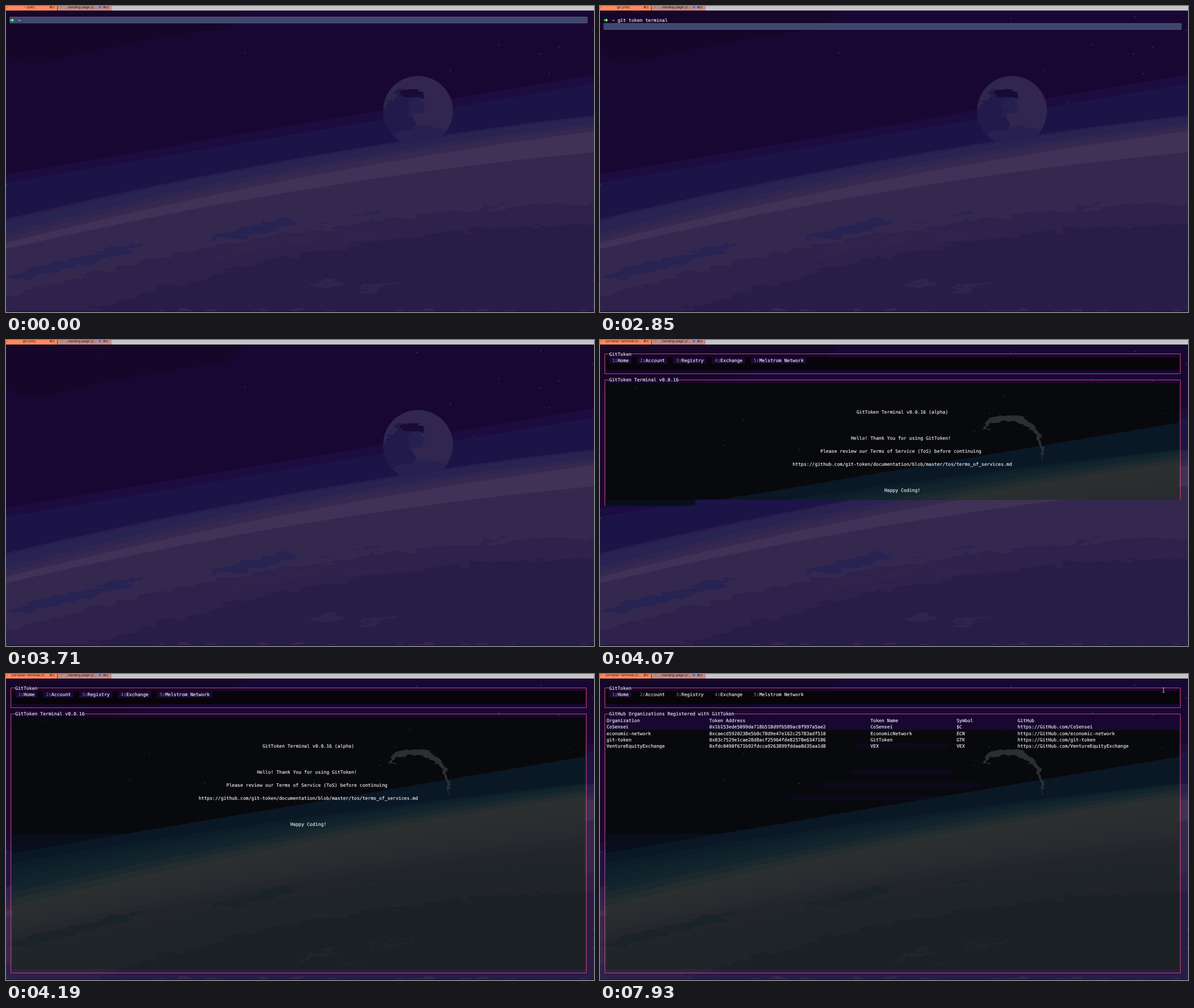
Animation of 1036x540 px, one loop 8000 ms. Source, as an HTML page:

```html
<!DOCTYPE html>
<html lang="en">
<head>
<meta charset="utf-8">
<title>Terminal session</title>
<style>
html, body { margin: 0; width: 100%; height: 100%; overflow: hidden; background: #190733; }
svg { display: block; width: 1036px; height: 540px; }
text { text-rendering: geometricPrecision; white-space: pre; }
.mono text { font: 8.13px "DejaVu Sans Mono", monospace; fill: #f1eff3; stroke: #f1eff3; stroke-width: .15px; }
.mono .dim { fill: #8d8298; stroke: none; }
.tabs text { font: 6.3px "Liberation Sans", "DejaVu Sans", sans-serif; fill: #211a1c; }
</style>
</head>
<body>
<svg id="stage" viewBox="0 0 1036 540">
  <defs>
    <clipPath id="inner"><rect x="11" y="76" width="1009" height="445"/></clipPath>
    <clipPath id="partial"><path d="M0 0H1036V281.5H168V293H0Z"/></clipPath>
    <clipPath id="disc"><circle cx="726" cy="185" r="61.5"/></clipPath>
    <filter id="rough" color-interpolation-filters="sRGB">
      <feTurbulence type="fractalNoise" baseFrequency=".03 .09" numOctaves="3" seed="4"/>
      <feDisplacementMap in="SourceGraphic" scale="26" xChannelSelector="R" yChannelSelector="G"/>
    </filter>
  </defs>
</svg>
<script>
const LOOP = 8000, COL = 4.895, ROW = 11.43, LEFT = 6.5, TOP = 19;
const colX = c => LEFT + c * COL;
const rowY = r => TOP + r * ROW;
const rect = (x, y, w, h, fill) =>
  `<rect x="${x}" y="${y}" width="${w}" height="${h}" fill="${fill}"/>`;
const path = (d, fill, extra = '') => `<path d="${d}" fill="${fill}" ${extra}/>`;
const blob = (x, y, rx, ry, turn, fill) =>
  `<ellipse rx="${rx}" ry="${ry}" fill="${fill}" transform="translate(${x} ${y}) rotate(${turn})"/>`;
const cell = (col, row, str) =>
  `<text x="${colX(col).toFixed(2)}" y="${(rowY(row) + 8.5).toFixed(2)}">${str}</text>`;
const group = (id, body, attrs = '') => `<g id="${id}" ${attrs}>${body}</g>`;
const rough = body => `<g filter="url(#rough)">${body}</g>`;
const repeat = (n, make) => Array.from({ length: n }, (_, i) => make(i)).join('');

let seed = 7;
const random = (min, max) => {
  seed = seed * 16807 % 2147483647;
  return +(min + (max - min) * seed / 2147483647).toFixed(1);
};

const mix = (a, b, k) => '#' + [1, 3, 5].map(i => {
  const [p, q] = [a, b].map(c => parseInt(c.slice(i, i + 2), 16));
  return Math.round(p + (q - p) * k).toString(16).padStart(2, '0');
}).join('');

// A band fills everything below a curve: left, control and right heights, colour.
const band = ([left, mid, right, fill]) =>
  path(`M0 ${left}Q518 ${mid} 1036 ${right}V540H0Z`, fill);
const bands = (edges, steps = 1) => edges.map((edge, i) => {
  const next = edges[i + 1] || edge;
  return repeat(edge === next ? 1 : steps, s => {
    const k = s / steps;
    return band([...edge.slice(0, 3).map((v, j) => v + (next[j] - v) * k), mix(edge[3], next[3], k)]);
  });
}).join('');

const stars = (bright, dim) => repeat(45, i => {
  const x = random(0, 1036), size = i % 4 ? 1 : 1.6;
  return rect(x, random(10, 340 - x * .18), size, size, i % 4 ? dim : bright);
});

const streaks = (n, x0, x1, y0, slope, fill) => repeat(n, () => {
  const x = random(x0, x1);
  return blob(x, y0 + slope * x + random(-16, 16), random(12, 45), random(1, 4), -11, fill);
});

const ground = c => rough(
  band([516, 366, 345, c.land]) + streaks(14, 560, 1036, 420, -.05, c.red) +
  band([590, 390, 387, c.dark]) +
  blob(120, 452, 125, 8, -14, c.blue) + blob(440, 395, 78, 8, -13, c.blue) +
  blob(637, 368, 18, 4, -5, c.blue) +
  streaks(14, 360, 620, 500, -.17, c.cloud) + streaks(5, 550, 690, 590, -.15, c.cloud));

const moon = `<g clip-path="url(#disc)">` + rect(664, 123, 124, 124, '#31264f') + rough(
  blob(694, 192, 30, 46, 12, '#221a4b') + blob(726, 236, 54, 24, -9, '#262152') +
  blob(722, 180, 14, 16, 0, '#262050') + blob(718, 156, 22, 8, 4, '#190a36')) + '</g>';

const night = rect(0, 0, 1036, 540, '#190733') +
  path('M0 8H420L390 40Q210 62 64 101 20 104 0 82Z', '#160629') +
  bands([[297, 209, 121, '#1d0c3f'], [312, 225, 137, '#1c1447']]) +
  stars('#24586c', '#3b3a6b') + moon +
  bands([[376, 252, 193, '#2b1e4c'], [381, 256, 196, '#282352'], [400, 264, 208, '#30264f'],
    [410, 272, 214, '#362950'], [418, 287, 221, '#403157'], [429, 307, 258, '#34284f']]) +
  ground({ land: '#2e214b', red: '#33204b', dark: '#281c48', blue: '#272353', cloud: '#30244d' }) +
  rect(0, 538.5, 1036, 1.5, '#1d1238');

const WELCOME = [
  [91, 9, 'GitToken Terminal v0.0.16 (alpha)'],
  [89, 13, 'Hello! Thank You for using GitToken!'],
  [78, 15, 'Please review our Terms of Service (ToS) before continuing'],
  [68, 17, 'https://github.com/git-token/documentation/blob/master/tos/terms_of_services.md'],
  [101, 21, 'Happy Coding!']
];
const residue = WELCOME.map(([col, row, str]) =>
  rect(colX(col), rowY(row) + 1, str.length * COL, ROW - 3, '#0c091d')).join('');

const crescent = rough(
  path('M668 160A61.5 61.5 0 0 1 772 226 62 62 0 0 0 752 150Q712 132 668 160Z', '#2b2f32') +
  blob(734, 238, 28, 5, -4, '#1d282e'));

const shade = rect(0, 60, 1036, 480, '#08090d') + group('residue', residue) +
  rect(0, 282, 1036, 258, '#080e1b') + stars('#2a3f4a', '#1c2127') +
  band([318, 230, 143, '#0a1725']) +
  `<g clip-path="url(#disc)">${crescent}</g>` +
  bands([[335, 246, 191, '#0c1d29'], [375, 258, 194, '#12252c'], [412, 284, 213, '#2c2f30'],
    [434, 316, 258, '#292c2f'], [470, 350, 300, '#22262b'], [540, 420, 370, '#1d2328']], 3) +
  ground({ land: '#1f2429', red: '#22242b', dark: '#1a2024', blue: '#1a2329', cloud: '#1f2529' });

const tabs = rect(0, 0, 1036, 8, '#c5c4c6') + rect(0, 0, 90, 8, '#ff895f') +
  rect(90, 0, 1.5, 8, '#5d4040') + rect(91.5, 0, 94.5, 8, '#c28d83') +
  '<text x="0" y="4" opacity=".4">×</text><text x="96" y="4" opacity=".4">×</text>' +
  '<text id="tabTitle" x="41" y="4.1" text-anchor="middle"></text>' +
  '<text x="76" y="4.1">⌘1</text><text x="104" y="4.1">.../landing-page (z...</text>' +
  '<circle cx="165.5" cy="2" r="2.4" fill="#2f7cf6"/><text x="170.5" y="4.1">⌘2</text>';

const guide = rect(LEFT, 0, 1018, 11.4, '#59628a') + rect(LEFT, .8, 1018, 9.8, '#40466f');
const shell = group('guide', guide) +
  path('M7 24.1H10.2V21.6L14.3 25 10.2 28.4V25.9H7Z', '#5dfa68') +
  cell(3, 0, '~') + group('typed', cell(5, 0, ''));

// Box border that leaves a gap for its title.
const frame = (top, bottom, title) => {
  const [y0, y1] = [top, bottom].map(r => Math.floor(rowY(r) + ROW / 2) + .5);
  return path(`M${colX(2)} ${y0}H8.5V${y1}H1022.5V${y0}H${colX(2 + title.length)}`, 'none',
    'stroke="#c2485f"') + cell(2, top, title);
};

let nextCol = 3;
const ITEMS = ['Home', 'Account', 'Registry', 'Exchange', 'Melstrom Network'].map(name => {
  const item = { name, col: nextCol };
  nextCol += name.length + 2 + (name === 'Home' ? 4 : 4);
  return item;
});
const itemBack = ({ name, col }) =>
  rect(colX(col - 1), rowY(1), (name.length + 4) * COL, ROW, '#190833');
const menu = rect(11, rowY(1), 1009, 2 * ROW, '#070509') + itemBack(ITEMS[0]) +
  group('itemBacks', ITEMS.slice(1).map(itemBack).join('')) +
  ITEMS.map(({ name, col }, i) =>
    cell(col, 1, `<tspan class="dim">${i + 1}</tspan>:${name}`)).join('') +
  frame(0, 3, 'GitToken');

const welcome = frame(4, 44, 'GitToken Terminal v0.0.16') +
  WELCOME.map(line => cell(...line)).join('');

const GITHUB = 'https://GitHub.com/';
const TABLE = [
  ['Organization', 'Token Address', 'Token Name', 'Symbol', 'GitHub'],
  ['CoSensei', '0x1b153ede5099da718b518d9fb589ac0f997a5ae2', 'CoSensei', '$C'],
  ['economic-network', '0xcaecd5920238e5b0c78d9e47e162c25783adf510', 'EconomicNetwork', 'ECN'],
  ['git-token', '0x03c7529e1cae28d8acf25964fde82578e6347186', 'GitToken', 'GTK'],
  ['VentureEquityExchange', '0xfdc0490f671b92fdcca9263899fddaa8d35aa1d8', 'VEX', 'VEX']
].map((line, r) => r ? [...line, GITHUB + line[0]] : line);
const TABLE_COLS = [1, 38, 96, 127, 149];
const registry = rect(10, rowY(5), 1011, 2 * ROW, '#180731') +
  frame(4, 44, 'GitHub Organizations Registered with GitToken') +
  TABLE.map((line, r) => line.map((str, c) => cell(TABLE_COLS[c], 5 + r, str)).join('')).join('');

const pointer = path('M991 24.5H994.6M992.8 24.5V32.5M991 32.5H994.6M992 29.5H993.6',
  'none', 'stroke="#d8d4de" stroke-width=".8"');

document.getElementById('stage').insertAdjacentHTML('beforeend',
  night + group('tabs', tabs, 'class="tabs"') +
  group('screen', group('shell', shell) + group('menu', menu) +
    group('panel', `<g clip-path="url(#inner)">${shade}</g>` +
      group('welcome', welcome) + group('registry', registry)) +
    group('pointer', pointer), 'class="mono"'));

const el = id => document.getElementById(id);
const typed = el('typed').firstChild;

// Keys pressed in each 90 ms slot.
const KEYS = 'g|||i|t |||t|o||k|e|n|| t|||e|r|mi||n|a|l'.split('|');
const TYPE = 330, SLOT = 90, ENTER = 2850, CLEAR = 3710, RENAME = 3830, MENU = 3980,
  PANEL = 4070, FULL = 4190, REGISTRY = 6490, POINTER = 7930;

const show = (id, on) => { el(id).style.display = on ? '' : 'none'; };
const write = (node, str) => { if (node.textContent !== str) node.textContent = str; };

function draw(t) {
  write(typed, KEYS.slice(0, Math.max(0, Math.floor((t - TYPE) / SLOT) + 1)).join(''));
  write(el('tabTitle'), t < ENTER ? '~ (zsh)' : t < RENAME ? 'git (zsh)' : 'GitToken Terminal (n...');
  el('guide').setAttribute('transform', `translate(0 ${rowY(t < ENTER ? 0 : 1)})`);
  el('panel').setAttribute('clip-path', t < FULL ? 'url(#partial)' : 'none');

  show('shell', t < CLEAR);
  show('menu', t >= MENU);
  show('itemBacks', t < REGISTRY);
  show('panel', t >= PANEL);
  show('welcome', t < REGISTRY);
  show('residue', t >= REGISTRY);
  show('registry', t >= REGISTRY);
  show('pointer', t >= POINTER);
}

const start = performance.now();
function tick() {
  draw((performance.now() - start) % LOOP);
  requestAnimationFrame(tick);
}
tick();
</script>
</body>
</html>
```
